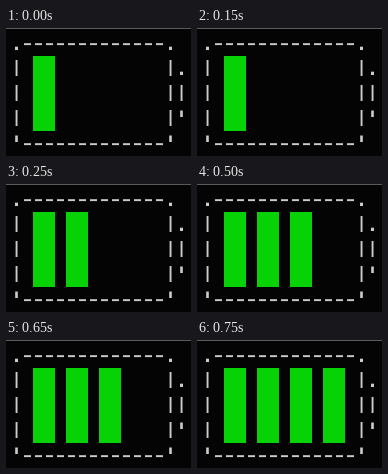
An HTML page that plays this animation: 185 px wide and 128 px high, repeating every 1000 ms.

```html
<!DOCTYPE html>
<html lang="en">
<head>
<meta charset="utf-8">
<title>Charging battery</title>
<style>
  html, body { margin: 0; width: 100%; height: 100%; overflow: hidden; background: #040404; }
  svg { display: block; width: 185px; height: 128px; }
</style>
</head>
<body>
<svg id="stage" viewBox="0 0 185 128"></svg>
<script>
const stage = document.getElementById('stage');
const CELL = 11, ROW = 25, LEFT = 5, TOP = 3;
const INK = '#cccccc', GREEN = '#06d206';
const STEP = 250, BARS = 4;

function rect(x, y, width, height, fill) {
  const node = document.createElementNS('http://www.w3.org/2000/svg', 'rect');
  for (const [key, value] of Object.entries({ x, y, width, height, fill })) {
    node.setAttribute(key, value);
  }
  return stage.appendChild(node);
}

// Each glyph is a box inside its cell: x, y, width, height.
const glyphs = {
  '.': [4, 15.7, 3, 3.3],
  '-': [2, 12.2, 7, 1.9],
  '|': [4.6, 4, 1.9, 16],
  "'": [4.2, 4.5, 2.6, 6.5]
};

const rows = [
  '.-------------.',
  '|             |.',
  '|             ||',
  "|             |'",
  "'-------------'"
];

rect(0, 0, 185, 128, '#040404');
rect(0, 0, 185, 1, '#5a5a5a');

rows.forEach((row, r) => [...row].forEach((char, c) => {
  if (char === ' ') return;
  const [x, y, w, h] = glyphs[char];
  rect(LEFT + c * CELL + x, TOP + r * ROW + y, w, h, INK);
}));

const bars = Array.from({ length: BARS }, (_, i) =>
  rect(LEFT + (2 + 3 * i) * CELL, TOP + ROW, 2 * CELL, 3 * ROW, GREEN));

function draw(time) {
  const filled = Math.floor(time / STEP) % BARS;
  bars.forEach((bar, i) => bar.setAttribute('visibility', i <= filled ? 'visible' : 'hidden'));
}

const start = performance.now();
function tick() {
  draw(performance.now() - start);
  requestAnimationFrame(tick);
}
tick();
</script>
</body>
</html>
```
